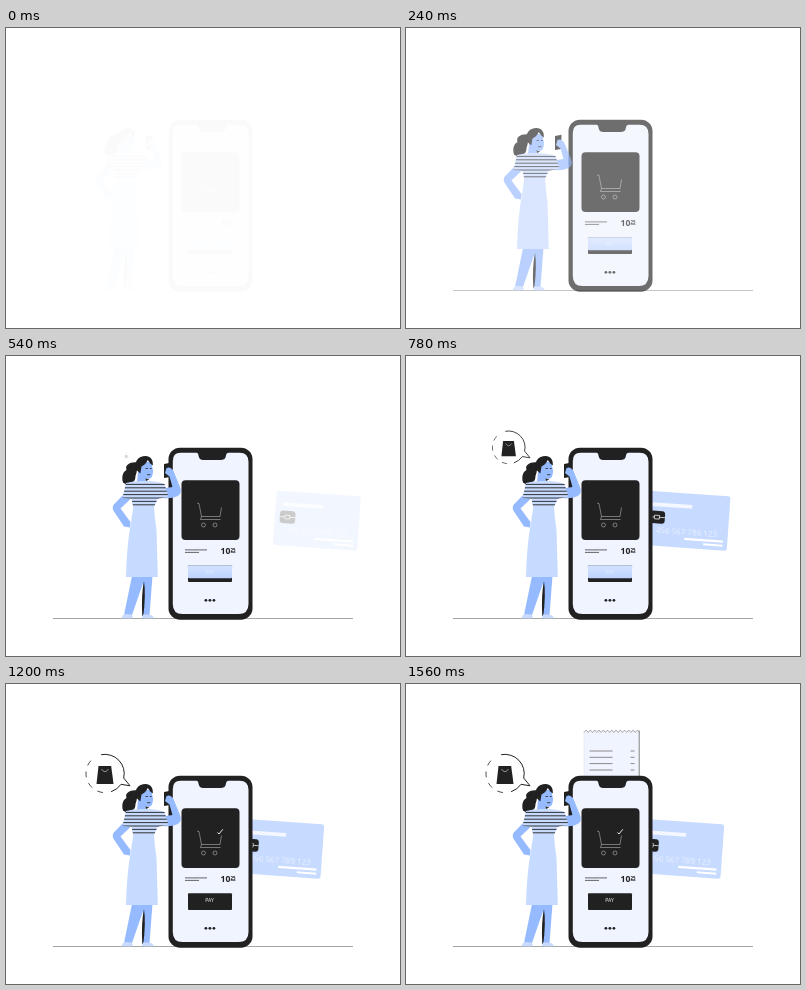
Write an HTML page that moves like this. It is 394 px wide and 300 px high and loops after 3600 ms.

```html
<!DOCTYPE html>
<html lang="en">
<head>
<meta charset="utf-8">
<title>Mobile payment</title>
<style>
  html, body { margin: 0; width: 100%; height: 100%; overflow: hidden; background: #fff; }
  svg { display: block; width: 100vw; height: 100vh; }
  text { font-family: "Open Sans", "Noto Sans", sans-serif; }
  .dark { fill: #212121; }
  .mid { fill: #96baff; }
  .pale { fill: #c7daff; }
  .line { fill: none; stroke: #212121; stroke-linecap: round; stroke-linejoin: round; }
</style>
</head>
<body>
<svg viewBox="0 0 394 300">
  <defs>
    <clipPath id="shirtClip">
      <path d="M117 142L120.500 127Q129 124.500 140 125Q151 125 159 128L163 140.500L152 143L148 152H128L126 143Z"/>
    </clipPath>
    <linearGradient id="face" x2="0" y2="1">
      <stop stop-color="#d3e2ff"/><stop offset="1" stop-color="#bdd3ff"/>
    </linearGradient>
  </defs>

  <path id="ground" d="M47 262.500H347" stroke="#a6a6a6" fill="none"/>

  <g transform="translate(-.5 0)">
  <g id="card">
    <g transform="translate(234.500 134.500) rotate(4.100)">
      <rect class="pale" width="84.500" height="54.500" rx="2.500"/>
      <rect x="7" y="11.200" width="40" height="3.800" fill="#fff" opacity=".8"/>
      <rect class="dark" x="5" y="19.600" width="15.500" height="12.400" rx="3"/>
      <path d="M5 25.800H10M15 25.800H20.500M10 24H15V27.600H10Z" fill="none" stroke="#fff" stroke-width=".7"/>
      <text x="12.500" y="41.500" font-size="8" fill="#eaf1ff">456 567 789 123</text>
      <rect x="41.500" y="44.300" width="38.500" height="2.300" fill="#fff"/>
      <rect x="60.500" y="48.600" width="19.500" height="2" fill="#fff"/>
    </g>
  </g>

  <g id="receipt">
    <path id="paper" fill="#f0f4ff"/>
    <path d="M178.500 47.500V150" stroke="#dde2ec" stroke-width=".5"/>
    <path d="M233.700 46.500V150" stroke="#777" stroke-width=".9"/>
    <path id="teeth" fill="none" stroke="#888" stroke-width=".7"/>
    <path id="rows" fill="none" stroke="#8a8a8a" stroke-width="1"/>
  </g>

  <g id="phone">
    <rect class="dark" x="163" y="91.700" width="84" height="172" rx="11.500"/>
    <path fill="#f0f4ff" d="M175 96.700H191Q193 97 193 99.500Q193.500 104 198 104H215Q220 104 220.500 99.500Q220.500 97 223 96.700H234Q243 96.700 243 106V248Q243 258 233 258H177Q167.300 258 167.300 248V105Q167.300 96.700 175 96.700Z"/>
    <rect class="dark" x="176" y="124.300" width="58" height="59.700" rx="4"/>
    <g fill="none" stroke="#ccc" stroke-width=".5">
      <path d="M191.500 147L193.500 147.500L196 160.500H214.500L216 151.500M196 160.500L195 163.500H215"/>
      <circle cx="198" cy="169" r="2"/><circle cx="209.500" cy="169" r="2"/>
      <path id="tick" d="M212 148.500L213.500 150L217.300 145.300" stroke="#fff" stroke-width=".9"/>
    </g>
    <path d="M179.500 193.900H201.500M179.500 196.400H193.500" stroke="#555" stroke-width=".9"/>
    <text class="dark" x="215" y="198.200" font-size="8.600" font-weight="700">10</text>
    <text class="dark" x="225" y="195.500" font-size="4.400" font-weight="700">25</text>
    <path d="M225.200 196.500H230" stroke="#212121" stroke-width=".6"/>
    <rect class="dark" x="182.500" y="209.300" width="44" height="16.700" rx="1"/>
    <rect id="cover" fill="url(#face)" x="182.500" y="209.300" width="44" height="13" rx="1"/>
    <text id="pay" x="204" y="217.900" font-size="5" text-anchor="middle" fill="#fff">PAY</text>
    <g class="dark">
      <circle cx="200.400" cy="244.300" r="1.400"/><circle cx="204.400" cy="244.300" r="1.400"/><circle cx="208.400" cy="244.300" r="1.400"/>
    </g>
  </g>

  <g id="woman">
    <path class="mid" d="M137.500 220H147L144 259H137Z"/>
    <path class="mid" d="M126.500 220H140L126.500 259H118.500Z"/>
    <path class="dark" d="M138.500 225Q140.500 238 137.800 260H136.800Q135.500 240 138.500 225Z"/>
    <path class="pale" d="M118.500 258L126 258.500Q128 260.500 127 262.300H116Q116.500 260 118.500 258ZM137.500 258.500H144Q148 260 148.500 262.300H136.500Z"/>
    <path class="mid" d="M117.500 139L108.300 148.500Q106 152 108.500 155.500L118.500 170.500L124.500 171.500L125 166L115 152.500L125 143Z"/>
    <path class="pale" d="M128 149H148.500Q149 160 151 174L152.300 221H120.500Q121 190 126 163Z"/>
    <path class="mid" d="M133.500 106L146 106Q146.700 111 147.500 114.500Q147.500 120 145.500 122Q142.500 124 140.500 122L141 127Q136 128.500 131.500 126.500Z"/>
    <path class="dark" d="M132 106.500C125 105.500 119 109 121 114C117 116 116 121 117.500 126.500Q121 129.500 125 127Q130 126 130 120Q132 115 132 106.500Z"/>
    <path class="dark" d="M131 114C128 105 133 100 140 100C145 100 148 104 147.300 109.500C145.500 108.500 143.500 106 142.300 104C141 107.500 138 109.500 136 110.500L134.800 117.500Z"/>
    <path class="line" d="M140.500 112.500H142M144.700 112.500H145.800M142 118.700H144.500" stroke-width=".8"/>
    <path class="dark" d="M140 122Q142 123.700 144 123.200L140.700 125Z"/>
    <path class="dark" d="M158.500 108L165 106.700L164.500 121L158.500 122Z"/>
    <path class="mid" d="M152 141.500Q168 144 174 138.500Q176.500 135.500 174 130L168 115Q165 110 161 112L159.500 117L164 120.500L167 131L160 132Z"/>
    <g clip-path="url(#shirtClip)">
      <rect class="pale" x="110" y="122" width="60" height="32"/>
      <path id="stripes" fill="none" stroke="#212121" stroke-width=".9"/>
    </g>
  </g>

  <g id="bubble">
    <circle cx="99.500" cy="89.500" r="19" fill="#fff"/>
    <path fill="#fff" d="M118 94L124.500 102L113 102Z"/>
    <path class="line" stroke-width="1" d="M96 70.600A19.200 19.200 0 0 1 118.200 94L124.500 101.800L115.500 100.300A19.200 19.200 0 0 1 106 107.600"/>
    <path class="line" stroke-width=".8" stroke-dasharray="5 7" d="M97 108.500A19.200 19.200 0 0 1 89 73.500"/>
    <path class="dark" d="M93 82H105.700L108 100H91Z"/>
    <path d="M96 85Q99.500 90.500 103 85" fill="none" stroke="#ddd" stroke-width=".6"/>
  </g>
  </g>
</svg>
<script>
const $ = id => document.getElementById(id);
const LOOP = 3600, STEP = 30;

// Torn receipt edge, its rows, and the shirt stripes
let edge = "M178.500 48.500";
const tooth = 55.500 / 13;
for (let i = 0; i < 13; i++) {
  const x = 178.500 + i * tooth;
  edge += `L${x + tooth / 2} 46L${x + tooth} 48.500`;
}
$("teeth").setAttribute("d", edge);
$("paper").setAttribute("d", edge + "V150H178.500Z");
$("rows").setAttribute("d", [67, 73.3, 79.6, 86].map(y => `M184 ${y}H207M225 ${y}H229`).join(""));
$("stripes").setAttribute("d", Array.from({ length: 7 }, (_, i) => `M112 ${128.4 + i * 3.4}H168`).join(""));

const clamp = v => Math.max(0, Math.min(1, v));
const ramp = (t, start, length) => clamp((t - start) / length);
const ease = p => (1 - Math.cos(Math.PI * p)) / 2;
const fade = (id, v) => $(id).setAttribute("opacity", v);
const move = (id, v) => $(id).setAttribute("transform", v);

function draw(t) {
  const show = t < 60 ? .015 : ramp(t, 15, 345);
  ["ground", "phone", "woman"].forEach(id => fade(id, show));
  move("woman", `translate(${-18 * (1 - ease(ramp(t, 0, 480)))} 0)`);

  const enter = ease(ramp(t, 420, 480));
  const enterFade = ease(ramp(t, 420, 380));
  fade("card", enterFade);
  move("card", `translate(${43 * (1 - enter)} 0)`);
  fade("bubble", enterFade);
  move("bubble", `translate(124.5 102) scale(${enter}) translate(-124.5 -102)`);

  const press = ramp(t, 810, 300);
  fade("cover", 1 - press);
  fade("tick", press);
  fade("pay", .5 + press / 2);

  fade("receipt", ramp(t, 1080, 360));
  move("receipt", `translate(0 ${55 * (1 - ease(ramp(t, 1080, 480)))})`);
}

const begin = performance.now();
function tick() {
  const t = (performance.now() - begin) % LOOP;
  draw(Math.floor(t / STEP) * STEP);
  requestAnimationFrame(tick);
}
tick();
</script>
</body>
</html>
```
